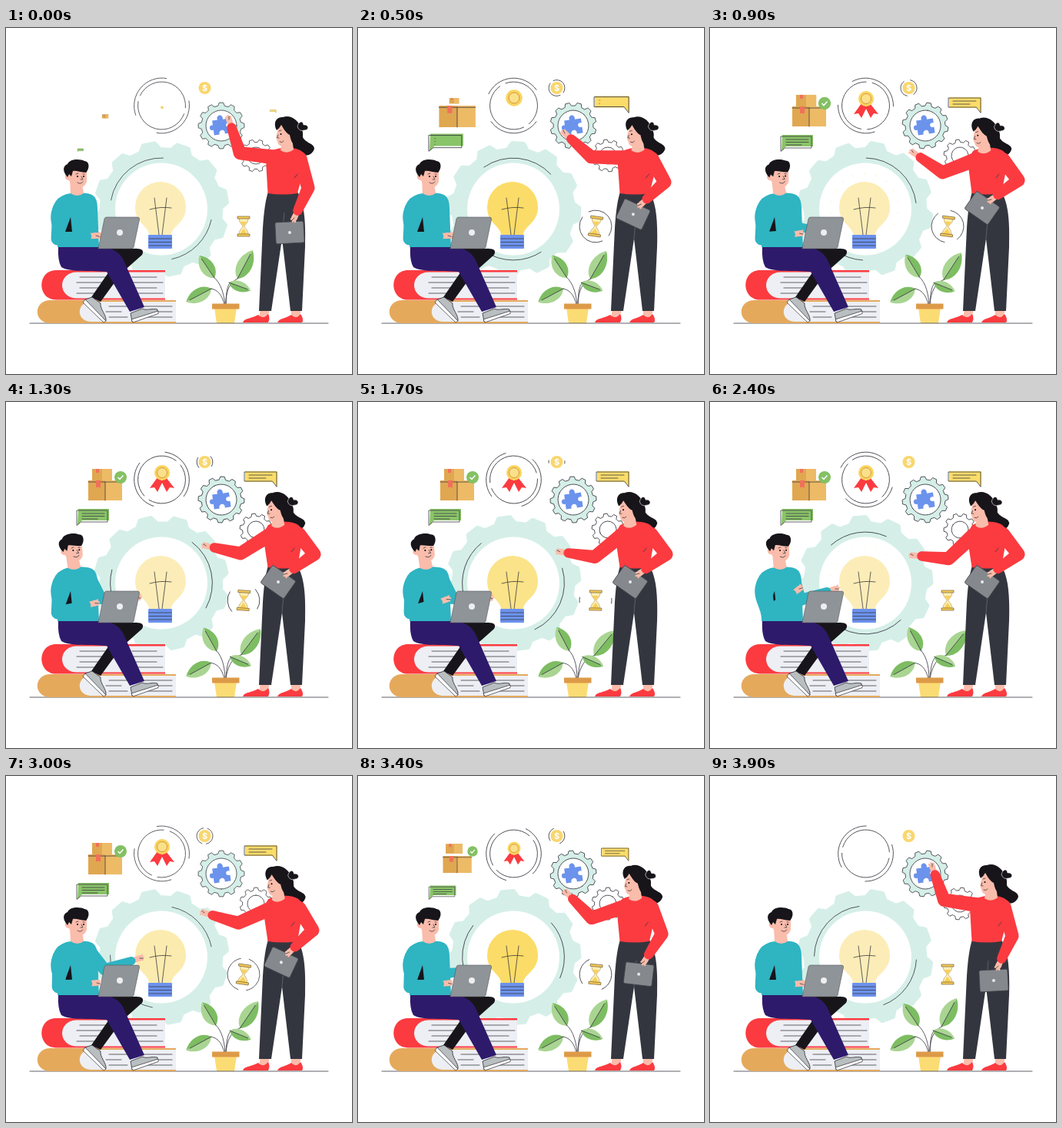
An HTML page that plays this animation: 450x450 px, repeating every 4000 ms.

```html
<!DOCTYPE html>
<html lang="en">
<head>
<meta charset="utf-8">
<title>Teamwork</title>
<style>
html, body { margin: 0; width: 100%; height: 100%; overflow: hidden; background: #fff; }
svg { display: block; width: 450px; height: 450px; }
.ln { fill: none; stroke: #3a3a42; stroke-width: .8; stroke-linecap: round; stroke-linejoin: round; }
.ink { fill: #17151a; }
.skin { fill: #fabcab; }
.red { fill: #fb3b40; }
.teal { fill: #2fb4c2; }
.box { fill: #e0a751; }
.lid { fill: #edbb66; }
.tape { fill: #f0715a; }
.shoe { fill: #b9bec1; stroke: #2b2b33; stroke-width: .8; }
.sole { fill: #fff; stroke: #2b2b33; stroke-width: .7; }
</style>
</head>
<body>
<svg viewBox="0 0 450 450">
  <g id="wheel" fill="#d5efe8" stroke="#d5efe8" stroke-width="5" stroke-linejoin="round"></g>
  <circle cx="202" cy="235.500" r="60" fill="#fff"/>
  <g id="wheelArcs" class="ln"></g>

  <g id="rays" stroke="#f8dc85" stroke-width="1.200" stroke-linecap="round"></g>
  <path id="bulb" d="M186 269C186 258 168 254 168 233A33 33 0 0 1 234 233C234 254 215 258 215 269Z"/>
  <path class="ln" d="M193 221L199 269M209 221L203 269M187 236Q201 232 215 234"/>
  <rect x="185" y="269" width="31" height="18" rx="1" fill="#6b92ee"/>
  <path class="ln" d="M186 274H215M186 278.500H215M186 283H215"/>

  <g id="ring" class="ln"></g>
  <g id="medal">
    <g id="ribbon" class="red">
      <path d="M197 98L187 112L193 111L197 117L204 103Z"/>
      <path d="M208 98L219 112L213 111L209 117L202 103Z"/>
    </g>
    <circle cx="203" cy="92" r="10" fill="#fad45e"/>
    <circle cx="203" cy="92" r="6.500" fill="#fbe08a" stroke="#c98a35" stroke-width=".8"/>
  </g>

  <circle cx="258.500" cy="78" r="8" fill="#fad66d"/>
  <text x="258.500" y="82" text-anchor="middle" font-family="Inter, Arial, sans-serif" font-size="11" font-weight="700" fill="#fff">$</text>
  <g id="coinArc" class="ln"></g>

  <g id="crates">
    <path class="box" d="M107 102H151V128H107Z"/>
    <path class="lid" d="M129 102H151V128H129Z"/>
    <path class="ln" d="M107 104H151M129 104V128"/>
    <path class="tape" d="M117 102H123V111H117Z"/>
  </g>
  <g id="crate">
    <path class="box" d="M112 87H138V102H112Z"/>
    <path class="lid" d="M125 87H138V102H125Z"/>
    <path class="tape" d="M117 87H121V92H117Z"/>
  </g>
  <g id="check">
    <circle cx="149" cy="98" r="8" fill="#84c064"/>
    <path d="M145.500 98L148 100.500L152.500 95.500" fill="none" stroke="#fff" stroke-width="1.500"/>
  </g>

  <g id="chatL">
    <path d="M94 139H134V154H99L93 160Z" fill="#8ac468"/>
    <path class="ln" d="M92 160V141H132V156H98Z"/>
    <path id="textL" class="ln" d="M99 145H128M99 148.500H128M99 152H119"/>
  </g>
  <g id="chatR">
    <path d="M311 90H353V110L347 104H311Z" fill="#fbdc6a"/>
    <path class="ln" d="M352 110V91H310V103H346Z"/>
    <path id="textR" class="ln" d="M316 95H346M316 99H338"/>
  </g>

  <g id="timerArc" class="ln"></g>
  <g id="timer">
    <path d="M-6 -11H6C6 -4 1 -2 1 0C1 2 6 4 6 11H-6C-6 4 -1 2 -1 0C-1 -2 -6 -4 -6 -11Z" fill="#fceeb4" stroke="#b08a3e" stroke-width=".6"/>
    <path d="M-4 -6H4L0 0ZM0 3L5 10H-5Z" fill="#f8cf57"/>
    <path d="M-8 -13H8V-10H-8ZM-8 10H8V13H-8Z" fill="#f6cc58" stroke="#5e4a2c" stroke-width=".6"/>
  </g>

  <g id="cog2"></g>
  <g id="cog1"></g>
  <path fill="#6b93ec" transform="translate(280 126) rotate(-8)" d="M-11 -7H-4C-6 -14 4 -15 3 -7H11V-1C5 -4 4 6 11 4V12H3C5 5 -5 5 -4 12H-11V5C-17 7 -17 -3 -11 -1Z"/>

  <g id="plant"></g>
  <path d="M271 364H300L297 384H274Z" fill="#fbdc74"/>
  <path d="M268 358.500H303.500V365.500H268Z" fill="#dd9a48"/>

  <path class="ln" d="M31 384H419"/>
  <path d="M58 354H221V384H58C35 384 35 354 58 354Z" fill="#e5a95c"/>
  <path d="M221 356H110C91 357 91 381 110 382H221Z" fill="#edeff4"/>
  <path class="red" d="M65 315H207V353.500H65C40 353.500 40 315 65 315Z"/>
  <path d="M207 317.500H91C67 319 67 350 91 351.500H207Z" fill="#edeff4"/>
  <g id="pages" class="ln"></g>

  <path class="ink" d="M130 287H170Q181 287 177 295L150 319L123 356L111 350L136 314Z"/>
  <path class="shoe" d="M103 353L112 350L123 358C122 366 131 373 130 381L102 358Z"/>
  <path class="sole" d="M100 357L127 383L130 381L103 353Z"/>
  <path class="shoe" d="M162 371L177 365C184 368 189 364 197 366V371L164 382Z"/>
  <path class="sole" d="M163 379L198 368V371.500L165 383Z"/>
  <path d="M68 284L126 285C140 287 148 292 153 302L180 363L161 369L131 317C105 315 84 318 72 311Q67 303 68 284Z" fill="#2e1a6b"/>

  <g id="farArm"></g>
  <path class="teal" d="M72 219C80 213 104 213 112 217Q119 221 119 235L121 285H67C68 268 55 258 59 239Q63 223 72 219Z"/>
  <path class="ink" d="M84 246L77 265H86Z"/>
  <g id="manHead">
    <path class="skin" d="M83 196L84 215Q93 221 101 215L99 203Z"/>
    <path class="skin" d="M80 183C85 179 100 178 105 183L105 200Q102 208 94 208Q85 206 82 198C76 198 75 190 80 190Z"/>
    <path class="ink" d="M80 194C73 186 74 179 80 177C83 170 96 170 102 173C109 173 109 183 104 188C97 188 91 185 87 186L85 193L82 190Z"/>
    <path class="ln" d="M91 190L94 189M100 190H102M98 193L100 197H97M93 201Q97 204 100 200"/>
    <circle cx="93" cy="193" r="1"/><circle cx="101" cy="193" r="1"/>
  </g>
  <path d="M131 246H171Q174 246 173.500 249L166 285Q165 287 163 287H120L128 248Q128.500 246 131 246Z" fill="#8f9498" stroke="#55555b" stroke-width=".6"/>
  <circle cx="148" cy="266" r="4" fill="#eceef0"/>
  <g id="nearArm"></g>

  <path class="skin" d="M331 364H343L341 376L329 379ZM371 364H384L382 376L371 379Z"/>
  <path class="red" d="M308 383C310 377 320 378 328 373Q334 380 341 372Q344 378 341 383ZM353 383C356 377 364 378 371 373Q377 380 383 372Q388 379 385 383Z"/>
  <path d="M341 213H379C388 228 390 250 389 285L385 368H370L359 274L345 368H329L334 260Q336 228 341 213Z" fill="#34363f"/>
  <path d="M359 274L362 240" fill="none" stroke="#666973" stroke-width=".8"/>
  <path id="hairBack" class="ink" d="M357 122C375 110 388 130 386 142C390 150 401 150 401 157C398 167 386 169 378 160C368 162 364 150 364 140Z"/>
  <path id="torso" class="red"/>
  <g id="tablet">
    <rect x="-18.500" y="-14" width="37" height="28" rx="2" fill="#85898e" stroke="#44444b" stroke-width=".8"/>
    <circle r="2" fill="#e4e6e9"/>
  </g>
  <g id="backArm"></g>
  <path id="fold" class="ln"/>
  <g id="womanHead">
    <path class="skin" d="M359 148L357 159Q365 165 374 158L372 143Z"/>
    <path class="skin" d="M355 128C352 138 350 143 353 147C354 156 363 155 368 149L376 133L366 122Z"/>
    <path class="ink" d="M352 133C347 124 351 115 360 116C370 112 381 120 384 131C389 140 384 148 378 154C371 151 370 143 369 139C364 137 360 129 358 126Q356 130 352 133Z"/>
    <path class="ink" stroke="#fff" stroke-width=".6" d="M379 128C381 121 386 120 387 126C394 125 395 133 388 133Q381 135 379 128Z"/>
    <path class="ln" d="M355 134L358 133M354 139L352.500 142.500L355 143M356 148Q359 150 361 147"/>
    <circle cx="357.500" cy="138" r="1"/>
  </g>
  <g id="frontArm"></g>
</svg>
<script>
const LOOP = 4000;
const $ = id => document.getElementById(id);
const move = (id, v) => $(id).setAttribute('transform', v);
const clamp = p => Math.max(0, Math.min(1, p));
const ramp = (t, a, b) => { const p = clamp((t - a) / (b - a)); return p * p * (3 - 2 * p); };
const swing = (t, a, b, c, d) => ramp(t, a, b) - ramp(t, c, d);
const lerp = (a, b, p) => a.map((x, i) => x + (b[i] - x) * p);
const polar = (r, deg, x = 0, y = 0) => [x + r * Math.cos(deg * Math.PI / 180), y + r * Math.sin(deg * Math.PI / 180)];
const scaleAt = (id, x, y, sx, sy = sx) => move(id, `translate(${x} ${y}) scale(${sx} ${sy}) translate(${-x} ${-y})`);

// Where the hands go: time, x, y.
const point = [[0, 290, 119], [500, 269, 137], [1300, 260, 187], [2200, 266, 205], [3000, 258, 178], [3900, 289, 118]];
const type = [[0, 117, 270], [600, 117, 270], [1800, 115, 256], [2400, 116, 243], [3000, 118, 269]];
const reach = [[600, 122, 270], [1300, 171, 254], [2000, 171, 255], [2400, 163, 243], [3000, 174, 237], [3800, 122, 270]];

function along(path, t) {
  const ring = [...path, [path[0][0] + LOOP, ...path[0].slice(1)]];
  if (t < path[0][0]) t += LOOP;
  const i = Math.max(1, ring.findIndex(k => k[0] > t));
  const a = ring[i - 1], b = ring[i];
  const p = (t - a[0]) / (b[0] - a[0]);
  return lerp(a.slice(1), b.slice(1), (p + ramp(p, 0, 1)) / 2);
}

function gear(n, r, R) {
  const pts = [];
  for (let i = 0; i < n; i++)
    for (const [f, d] of [[-.32, r], [-.17, R], [.17, R], [.32, r]]) pts.push(polar(d, (i + f) * 360 / n));
  return `<path d="M${pts.join('L')}Z"/>`;
}

function arc(r, a, b) {
  return `<path d="M${polar(r, a)}A${r} ${r} 0 ${b - a > 180 ? 1 : 0} 1 ${polar(r, b)}"/>`;
}

function taper([x1, y1], [x2, y2], r1, r2) {
  const d = Math.hypot(x2 - x1, y2 - y1) || 1, nx = (y1 - y2) / d, ny = (x2 - x1) / d;
  return `M${x1 + nx * r1} ${y1 + ny * r1}A${r1} ${r1} 0 0 1 ${x1 - nx * r1} ${y1 - ny * r1}` +
    `L${x2 - nx * r2} ${y2 - ny * r2}A${r2} ${r2} 0 0 1 ${x2 + nx * r2} ${y2 + ny * r2}Z`;
}

// Elbow of a two-bone limb; side picks the way it bends.
function elbow(s, h, upper, lower, side) {
  const dx = h[0] - s[0], dy = h[1] - s[1], d = Math.min(Math.hypot(dx, dy), upper + lower);
  const a = (upper ** 2 - lower ** 2 + d * d) / (2 * d), b = side * Math.sqrt(Math.max(0, upper ** 2 - a * a));
  return [s[0] + (dx * a - dy * b) / d, s[1] + (dy * a + dx * b) / d];
}

function arm(id, s, e, h, cls, r) {
  const w = lerp(e, h, .76), d = Math.hypot(h[0] - w[0], h[1] - w[1]) || 1;
  const ux = (h[0] - w[0]) / d, uy = (h[1] - w[1]) / d;
  const finger = (k, len) => `M${h}L${h[0] + ux * len - uy * k} ${h[1] + uy * len + ux * k}`;
  $(id).innerHTML =
    `<path class="skin" d="${taper(w, h, 3.4, 4)}"/>` +
    `<path d="${finger(-3, 4)}${finger(0, 5)}${finger(3, 3)}" stroke="#fabcab" stroke-width="2.6" stroke-linecap="round"/>` +
    `<path class="ln" d="${finger(1.5, 4)}"/>` +
    `<path class="${cls}" d="${taper(s, e, r, r * .9)}${taper(e, w, r * .9, r * .65)}"/>`;
}

function leaf(x, y, deg, len, w) {
  const half = s => `M0 0C${len * .2} ${s * w} ${len * .7} ${s * w} ${len} 0Z`;
  return `<g transform="translate(${x} ${y}) rotate(${deg})"><path fill="#7dbd62" d="${half(1)}"/>` +
    `<path fill="#a9d592" d="${half(-1)}"/><path class="ln" d="M0 0H${len * .85}"/></g>`;
}

const stems = [
  ['M285 360C283 341 277 327 266 321', leaf(271, 325, -124, 35, 12), 6.5],
  ['M286 360C286 341 291 330 303 325', leaf(301, 326, -62, 42, 13), 12],
  ['M284 360C281 346 274 339 265 339', leaf(267, 339, 152, 37, 12), -1],
  ['M286 360C286 344 288 335 291 332', leaf(290, 331, 20, 30, 9), 4]
];
$('plant').innerHTML = stems.map(([d, l]) => `<g><path class="ln" d="${d}"/>${l}</g>`).join('');
$('wheel').innerHTML = gear(12, 78, 86);
$('wheelArcs').innerHTML = arc(66.5, 190, 272) + arc(66.5, 12, 78);
$('ring').innerHTML = arc(31, 20, 190) + arc(31, 205, 365) + arc(36, 160, 280) + arc(36, -10, 100);
$('cog1').innerHTML = `<g class="ln" style="fill:#d5efe8">${gear(12, 26, 30)}<circle r="20" fill="#fff"/></g>`;
$('cog2').innerHTML = `<g class="ln" style="fill:#fff">${gear(10, 17.5, 21)}<circle r="11"/></g>`;

// Text lines on the two books, broken in the middle.
let lines = '';
for (let i = 0; i < 4; i++) {
  const y = 324 + i * 7, k = i % 2 * 8;
  lines += `M${96 - k / 2} ${y}H${130 - i * 5}M${164 - k / 3} ${y}H${196 + k}`;
  if (i < 3) lines += `M${134 - k / 2} ${y + 38}H${158 - k}M${178 + k} ${y + 38}H216`;
}
$('pages').innerHTML = `<path d="${lines}"/>`;

const backOut = p => { const q = clamp(p) - 1; return 1 + 2.7 * q ** 3 + 1.7 * q * q; };

function pop(id, x, y, t, start, dur = 730) {
  scaleAt(id, x, y, Math.max(0, backOut((t - start) / dur)) * (1 - ramp(t, 3400, 3800)));
}

// The bulb lights up every 1450 ms and throws off short rays.
function light(t) {
  let glow = 0, rays = '';
  for (let f = 550; f < LOOP; f += 1450) {
    const d = t - f;
    glow = Math.max(glow, swing(d, -550, -100, 50, 380));
    if (d < 0 || d > 500) continue;
    for (let a = 150; a <= 390; a += 20)
      rays += `<path opacity="${.9 * (1 - d / 500)}" d="M${polar(35 + d * .022, a, 201, 233)}L${polar(37 + d * .022, a, 201, 233)}"/>`;
  }
  $('bulb').setAttribute('fill', `rgb(${lerp([252, 237, 184], [251, 220, 104], glow).map(Math.round)})`);
  $('rays').innerHTML = rays;
}

function badges(t) {
  const u = (t + 100) % LOOP, write = ramp(u, 540, 1000);
  pop('medal', 203, 106, u, 70);
  pop('crates', 129, 115, u, 70);
  pop('chatL', 93, 161, u, 70);
  pop('chatR', 351, 110, u, 70);
  pop('crate', 125, 95, u, 540, 500);
  pop('check', 149, 98, u, 650, 400);
  scaleAt('ribbon', 203, 92, ramp(u, 550, 950));
  scaleAt('textL', 99, 0, write, 1);
  scaleAt('textR', 316, 0, write, 1);
  $('textL').style.opacity = $('textR').style.opacity = write > 0 ? 1 : 0;
}

function woman(t) {
  const lean = swing(t, 300, 1200, 2900, 3800), hold = swing(t, 0, 750, 2600, 3800);
  const s = -4 * lean, head = `translate(${-12 * lean} ${2 * lean}) rotate(${-2 * lean} 365 150)`;
  move('womanHead', head);
  move('hairBack', head);
  $('torso').setAttribute('d', `M${345 + s} 160Q${357 + s} 154 ${372 + s} 156Q${391 + s} 158 ${390 + s} 175L379 215Q360 218 340.500 215L${338 + s} 172Z`);
  $('fold').setAttribute('d', `M${379 + s} 190L${375 + s} 195`);
  const front = [349 - 6 * lean, 168 + 5 * lean], hand = along(point, t);
  arm('frontArm', front, elbow(front, hand, 45, 46, -1), hand, 'red', 9.5);
  arm('backArm', [382 + s / 3, 170 + 2 * lean], lerp([393, 208], [401, 198], hold), lerp([375, 247], [366, 223], hold), 'red', 9.5);
  const [x, y, a] = lerp([369, 266, -3], [354, 234, 35], hold);
  move('tablet', `translate(${x} ${y}) rotate(${a})`);
}

function man(t) {
  const nod = swing(t, 600, 1200, 2100, 2600);
  move('manHead', `translate(${-4 * nod} 0) rotate(${-5 * nod} 92 212)`);
  const near = [70, 236], far = [108, 227], typing = along(type, t), reaching = along(reach, t);
  arm('nearArm', near, elbow(near, typing, 38, 50, 1), typing, 'teal', 9.5);
  arm('farArm', far, elbow(far, reaching, 32, 48, 1), reaching, 'teal', 8.5);
}

function draw(t) {
  const turn = t * 360 / LOOP;
  const spin = (id, x, y, a) => move(id, `translate(${x} ${y}) rotate(${a})`);
  spin('wheel', 202, 235.5, turn - 101);
  spin('wheelArcs', 202, 235.5, turn);
  spin('ring', 202.5, 101, turn);
  spin('cog1', 280, 127, -turn);
  spin('cog2', 325, 166, turn);

  // Loose arcs open and close around the coin and the hourglass.
  const p = t % 2400, open = swing(p, 0, 450, 600, 2000) * (1 - ramp(t, 3300, 3700));
  const loose = r => open > .02 ? arc(r, 20, 20 + open * 150) + arc(r, 200, 200 + open * 150) : '';
  $('timerArc').innerHTML = loose(21);
  $('coinArc').innerHTML = loose(10.5);
  spin('timerArc', 309, 258, turn);
  spin('coinArc', 258.5, 78, turn);
  spin('timer', 309, 258, 8 * open);

  const sway = Math.sin(Math.PI * t / LOOP) ** 2;
  [...$('plant').children].forEach((g, i) => g.setAttribute('transform', `rotate(${stems[i][2] * sway} 285 359)`));

  light(t);
  badges(t);
  woman(t);
  man(t);
}

const begin = performance.now();
function frame() {
  draw((performance.now() - begin) % LOOP);
  requestAnimationFrame(frame);
}
frame();
</script>
</body>
</html>
```
